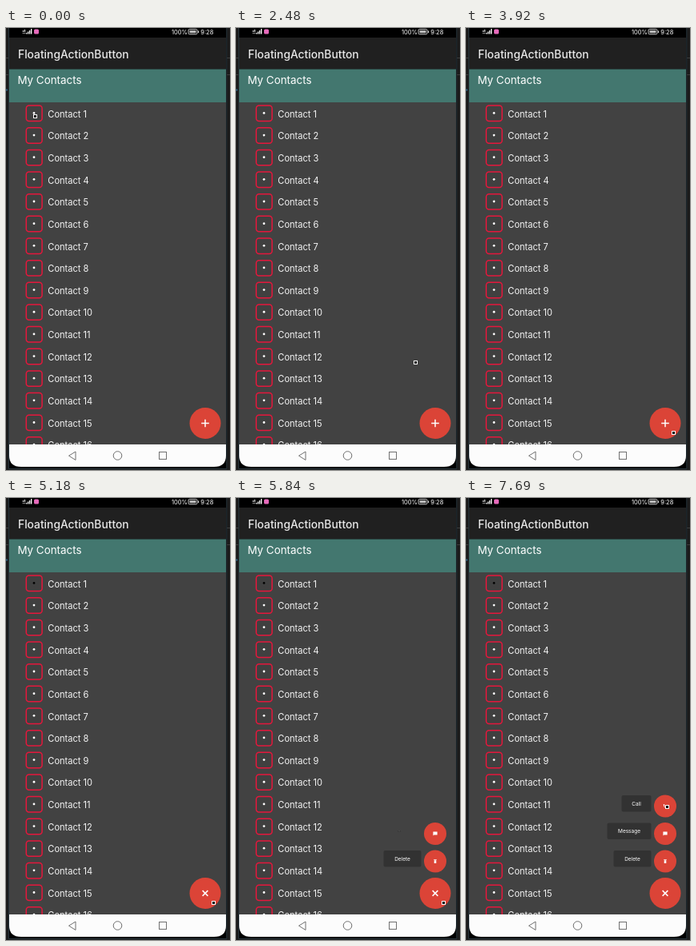
Write an HTML page that moves like this. It is 280x553 px and loops after 8000 ms.

```html
<!DOCTYPE html>
<html lang="en">
<head>
<meta charset="utf-8">
<title>Floating action button</title>
<style>
  html, body { margin: 0; width: 100%; height: 100%; overflow: hidden; background: #1b1b1b; }
  svg { display: block; width: 280px; height: 553px; }
  text { font-family: Inter, Roboto, sans-serif; fill: #fff; }
  .row text { font-size: 11.1px; fill: #f4f4f4; }
  .label text { font-size: 6.5px; text-anchor: middle; }
  .status { font-size: 7.5px; }
  .line { fill: none; stroke: #fff; stroke-width: 1.5; }
  .nav { fill: none; stroke: #707070; stroke-width: 1; }
</style>
</head>
<body>
<svg viewBox="0 0 280 553">
  <defs>
    <clipPath id="list"><rect x="4" y="93" width="271" height="428"/></clipPath>
  </defs>

  <!-- surroundings and device -->
  <rect width="280" height="553" fill="#1b1b1b"/>
  <path d="M0 37.5H4M276 37.5H280M0 58.5H4M276 58.5H280" stroke="#3c3c3c"/>
  <path d="M0 77.5H2" stroke="#2d5f80" stroke-width="2"/>
  <path d="M3 0V551H276V0Z" fill="#000"/>
  <path d="M3.500 0V551.500H275.800V0" fill="none" stroke="#2b3a42" stroke-width=".9"/>

  <!-- status bar -->
  <g fill="#fff">
    <path d="M21 3h1v2h-1zM23 2h1v3h-1zM21 6h1v1h-1zM23 6h1v1h-1z"/>
    <path d="M25 6h1.300v1.500h-1.300zM27 4.500h1.300v3h-1.300zM29 3h1.300v4.500h-1.300zM31 1h1.300v6.500h-1.300z"/>
  </g>
  <rect x="35" y="1.500" width="6" height="6" rx="1.500" fill="#e66abb"/>
  <text class="status" x="207" y="7.500">100%</text>
  <rect x="228" y="1.500" width="11" height="6.300" rx="1.500" fill="none" stroke="#ddd" stroke-width=".9"/>
  <rect x="229.500" y="3" width="8" height="3.300" fill="#bbb"/>
  <path d="M240.500 3.500V6" stroke="#ddd"/>
  <text class="status" x="243.300" y="7.500">9:28</text>

  <!-- title and header -->
  <rect x="4" y="12" width="271" height="39.500" fill="#202020"/>
  <text x="15" y="38" font-size="13.800" font-weight="500" style="fill:#e8e8e8">FloatingActionButton</text>
  <rect x="4" y="51.500" width="271" height="41.500" fill="#43776f"/>
  <text x="14.400" y="69.800" font-size="13.400">My Contacts</text>

  <rect x="4" y="93" width="271" height="428" fill="#424242"/>
  <g id="rows" clip-path="url(#list)"></g>

  <g id="minis"></g>
  <circle id="fab" cx="249" cy="494.500" r="19.500" fill="#db4437"/>
  <path id="plus" class="line" d="M-4.800 0H4.800M0 -4.800V4.800"/>

  <!-- navigation bar -->
  <path d="M4 521H275V535Q275 549 260 549H19Q4 549 4 535Z" fill="#fcfcfc"/>
  <path class="nav" d="M87 530V540.500L78.500 535.200Z" stroke-linejoin="round"/>
  <circle class="nav" cx="139.500" cy="535" r="5.300"/>
  <rect class="nav" x="191.500" y="530.500" width="9" height="9"/>

  <g id="cursor">
    <rect width="5" height="5" fill="#fff"/>
    <rect x="1" y="1" width="3" height="3" fill="#000"/>
  </g>
</svg>

<script>
const LOOP = 8000, PRESS = 4570, OPEN = 5050;
const $ = id => document.getElementById(id);

function add(parent, tag, attrs, text) {
  const el = document.createElementNS("http://www.w3.org/2000/svg", tag);
  for (const k in attrs) el.setAttribute(k, attrs[k]);
  if (text) el.textContent = text;
  return parent.appendChild(el);
}

// Contact list
const dots = [];
for (let i = 0; i < 16; i++) {
  const row = add($("rows"), "g", { class: "row", transform: `translate(0 ${106.8 + i * 27.65})` });
  add(row, "rect", { x: 25.3, y: -9.7, width: 19.8, height: 19.4, rx: 3.5,
    fill: "#404040", stroke: "#e5173c", "stroke-width": 1.5 });
  dots.push(add(row, "circle", { cx: 35, cy: -0.4, r: 1.4, fill: "#fff" }));
  add(row, "text", { x: 52.3, y: 4.8 }, "Contact " + (i + 1));
}

// Small buttons, from the bottom up
const items = [
  { name: "Delete", w: 47, icon: "M-1.3 -1.3H1.3V2.4H-1.3ZM-1.8 -2.3H1.8V-1.6H-1.8Z" },
  { name: "Message", w: 55, icon: "M-2.6 -2.4H2.6V1.5H-1.5L-2.6 2.6Z" },
  { name: "Call", w: 37, icon: "M-2.3 -2.3L-1.2 -2.5L-.5 -1L-1.2 -.3Q-.5 .9 .5 1.3L1.2 .5L2.5 1.2L2.3 2.3Q-2 2.5 -2.3 -2.3Z" }
];
items.forEach((it, i) => {
  it.y = 454.5 - 34.5 * i;
  it.start = OPEN + 130 + 525 * i;
  it.label = add($("minis"), "g", { class: "label" });
  add(it.label, "rect", { x: -it.w / 2, y: -10.2, width: it.w, height: 20.4, rx: 2, fill: "#323232" });
  add(it.label, "text", { x: 0, y: 2.3 }, it.name);
  it.disc = add($("minis"), "g", {});
  add(it.disc, "circle", { r: 14, fill: "#db4437" });
  add(it.disc, "path", { d: it.icon, fill: "#fff" });
});

// Pointer moves: start, number of 120 ms steps, goal
const moves = [
  [1340, 3, 153, 247], [1850, 2, 78, 170], [2120, 1, 67, 135], [2240, 3, 222, 416],
  [2600, 1, 229, 450], [2850, 1, 214, 437], [3010, 1, 233, 497], [3130, 1, 182, 430],
  [3280, 1, 174, 383], [3400, 2, 257, 504], [7300, 1, 258, 407], [7450, 3, 249, 384]
];

function pointer(t) {
  let x = 34, y = 108;
  for (const [start, steps, gx, gy] of moves) {
    if (t < start) break;
    const p = Math.min(1, (Math.floor((t - start) / 120) + 1) / steps);
    x += (gx - x) * p;
    y += (gy - y) * p;
  }
  return `translate(${Math.round(x)} ${Math.round(y)})`;
}

const grow = (t, from, ms) => Math.min(1, Math.max(0, (t - from) / ms));

function scaleAt(el, x, y, s) {
  el.setAttribute("transform", `translate(${x} ${y}) scale(${s})`);
  el.setAttribute("visibility", s > 0 ? "visible" : "hidden");
}

function draw(time) {
  $("cursor").setAttribute("transform", pointer(time));
  dots[0].setAttribute("fill", time >= PRESS ? "#000" : "#fff");
  $("fab").setAttribute("fill", time >= PRESS && time < OPEN ? "#e0574b" : "#db4437");

  // The menu opens in even steps
  const step = 128.6;
  const t = OPEN + Math.floor((time - OPEN) / step) * step;
  $("plus").setAttribute("transform", `translate(249 494.5) rotate(${45 * grow(t, OPEN - 20, 145)})`);
  for (const it of items) {
    scaleAt(it.disc, 249, it.y, grow(t, it.start, 110));
    scaleAt(it.label, 231.5 - it.w / 2, it.y - 3.2, grow(t, it.start + 85, 480));
  }
}

const begin = performance.now();
function frame() {
  draw((performance.now() - begin) % LOOP);
  requestAnimationFrame(frame);
}
draw(0);
requestAnimationFrame(frame);
</script>
</body>
</html>
```
